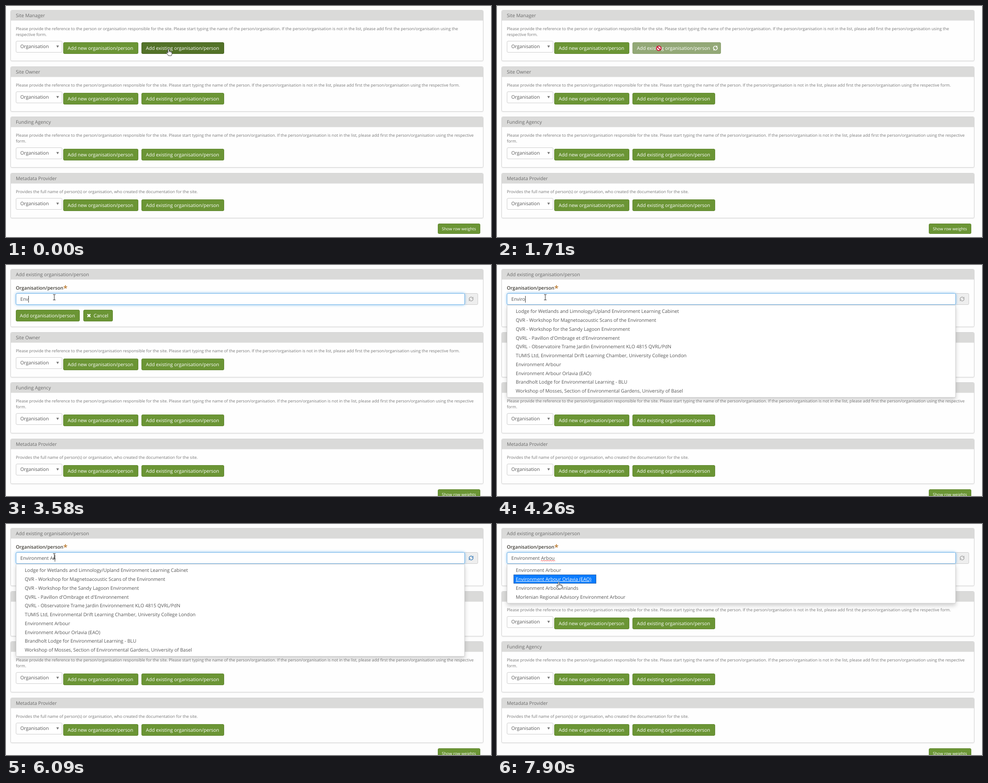
An HTML page that plays this animation: 1085x516 px, repeating every 8 s.

```html
<!DOCTYPE html>
<html lang="en">
<head>
<meta charset="utf-8">
<title>Add existing organisation</title>
<style>
html, body { margin: 0; width: 100%; height: 100%; overflow: hidden; background: #fdfdfd; }
svg { display: block; width: 1085px; height: 516px; }
text { font: 10.63px "Open Sans", "Noto Sans", sans-serif; white-space: pre; text-rendering: geometricPrecision; fill: #555; }
.head { fill: #6a6a6a; }
.small { font-size: 9.14px; fill: #777; }
.white { fill: #fff; }
.label { font-weight: 600; fill: #3f3c35; }
.star { font-size: 17px; font-weight: 600; fill: #b9772a; }
.panel { fill: #fefefe; stroke: #d3d3d3; filter: drop-shadow(0 1px 1px rgba(0,0,0,.08)); }
.btn { fill: #6b9535; stroke: #5e852e; }
.btn.hover { fill: #537228; stroke: #476322; }
.btn.off { fill: #93a877; stroke: #8ca16f; }
.field { fill: #fff; stroke: #ccc; }
.glow { fill: #fff; stroke: #66afe9; filter: drop-shadow(0 0 3px rgba(102,175,233,.75)); }
.menu { fill: #fff; stroke: #c9c9c9; filter: drop-shadow(0 5px 5px rgba(0,0,0,.18)); }
.item rect { fill: none; }
.pick rect { fill: #0a7cff; stroke: #1559a8; }
.pick text { fill: #fff; text-decoration: underline; }
</style>
</head>
<body>
<svg id="stage" viewBox="0 0 1085 516"></svg>
<script>
const LOOP = 8000;
const TYPED = 'Environment Arbou';
const KEY_TIMES = [3310, 3440, 3580, 3730, 3900, 4080, 4450, 4700, 4950, 5210,
  5450, 5530, 5770, 6020, 6100, 6240, 6590];
const BUSY = [[3730, 4200], [4450, 5050], [6020, 6320], [6870, 7050]];
const POINTER = [[0, 363.5, 95.5], [2060, 363.5, 95.5], [2180, 270, 88], [2340, 95, 74],
  [2420, 108, 72], [7480, 108, 72], [7620, 113, 84], [7900, 138, 129.5]];

const INTRO = 'Please provide the reference to the person';
const TAIL = 'If the person/organisation is not in the list, please add first the person/organisation using the';
const MENUS = [[
  'Lodge for Wetlands and Limnology/Upland Environment Learning Cabinet',
  'QVR - Workshop for Magnetoacoustic Scans of the Environment',
  'QVR - Workshop for the Sandy Lagoon Environment',
  "QVRL - Pavillon d'Ombrage et d'Environnement",
  'QVRL - Observatoire Trame Jardin Environnement KLO 4815 QVRL/PdN',
  'TUMIS Ltd, Environmental Drift Learning Chamber, University College London',
  'Environment Arbour',
  'Environment Arbour Orlavia (EAO)',
  'Brandholt Lodge for Environmental Learning - BLU',
  'Workshop of Mosses, Section of Environmental Gardens, University of Basel'
], [
  'Environment Arbour',
  'Environment Arbour Orlavia (EAO)',
  'Environment Arbour Inlands',
  'Western Fjord Secretariat of Environment and Meadow Restoration',
  'Orlavian Regional Chamber of Horticulture, Orchards, Environment and River Stewardship',
  'LORAB – Lodge for the Learning and Craftwork of Agro-Environment and Botanical Gardens, University of Trás-os-Montes e Alto Douro',
  'Morlenian Regional Advisory Environment Arbour'
], [
  'Environment Arbour',
  'Environment Arbour Orlavia (EAO)',
  'Environment Arbour Inlands',
  'Morlenian Regional Advisory Environment Arbour'
]];

const text = (x, y, str, cls = '') => `<text x="${x}" y="${y}" class="${cls}">${str}</text>`;
const rect = (x, y, w, h, cls, r = 2.5, extra = '') =>
  `<rect x="${x}" y="${y}" width="${w}" height="${h}" rx="${r}" class="${cls}" ${extra}/>`;
const button = (x, y, w, label, tx, id = '') =>
  rect(x, y, w, 25, 'btn', 2.5, id && `id="${id}"`) + text(tx, y + 16.4, label, 'white');

function panel(y, h, title) {
  return rect(10.5, y, 1057, h, 'panel') +
    `<path d="M11 ${y + 23}V${y + 3}q0-2.5 2.5-2.5H1064.5q2.5 0 2.5 2.5V${y + 23}z" fill="#dadad9"/>` +
    text(22, y + 15.3, title, 'head');
}

function section(y, title, lines, id) {
  const drop = lines.length > 1 ? 0 : -13;
  return panel(y, 113 + drop, title) +
    lines.map((line, i) => text(22, y + 44.5 + 12.8 * i, line, 'small')).join('') +
    rect(22.5, y + 69 + drop, 103, 25, 'field') +
    text(32, y + 84.6 + drop, 'Organisation') +
    `<path d="M112.5 ${y + 78.8 + drop}h6l-3 5z" fill="#777"/>` +
    button(128.5, y + 72 + drop, 167, 'Add new organisation/person', 138) +
    button(303.5, y + 72 + drop, 184, 'Add existing organisation/person', 313, id);
}

const refresh = id => `<g id="${id}" fill="none" stroke="currentColor">
  <path d="M-4.2 1A4.3 4.3 0 0 1 2.8-3.3M4.2-1A4.3 4.3 0 0 1-2.8 3.3" stroke-width="1.5"/>
  <path d="M5-5.2V-1H.8zM-5 5.2V1H-.8z" fill="currentColor" stroke="none"/></g>`;

const menu = (items, i) => `<g id="menu${i}">` +
  rect(22.5, 89.5, 1003.5, items.length * 19.77 + 8.5, 'menu', 2) +
  items.map((item, n) => `<g class="item">` +
    rect(37.5, 93.7 + 19.77 * n, 184.5, 19, '', 0) +
    text(42, 107.3 + 19.77 * n, item) + '</g>').join('') + '</g>';

const stage = document.getElementById('stage');
stage.innerHTML = `
<g id="overview">
  ${section(9.5, 'Site Manager', [
    `${INTRO} or organisation responsible for the site. Please start typing the name of the person/organisation. ${TAIL}`,
    'respective form.'], 'existing')}
  <g id="wait" transform="translate(488.5 94)" color="#fff">${refresh('waitIcon')}</g>
</g>
<g id="form">
  ${panel(9.5, 128.5, 'Add existing organisation/person')}
  ${text(22, 55.2, 'Organisation/person', 'label')}${text(128.2, 58.3, '*', 'star')}
  ${rect(1024.5, 63.5, 31, 25, 'field', 2.5, 'style="fill:#eee"')}
  ${rect(22.5, 63.5, 1003.5, 25, 'field')}
  ${rect(22.5, 63.5, 1003.5, 25, 'glow', 2.5, 'id="glow"')}
  <text id="typed" x="32" y="80.3"></text>
  <path id="squiggle" d="M98 83${'l2-2l2 2'.repeat(8)}" fill="none" stroke="#e33" stroke-width=".9"/>
  <path id="caret" d="M0 69V84" stroke="#333"/>
  <g transform="translate(1040.5 76)">${refresh('busyIcon')}</g>
  ${button(22.5, 100.5, 142, 'Add organisation/person', 31)}
  ${button(173.5, 100.5, 65, 'Cancel', 196)}
  <path d="M182.3 109.8l6.4 6.4m0-6.4l-6.4 6.4" stroke="#fff" stroke-width="2.6"/>
</g>
<g id="rest">
  ${section(135.5, 'Site Owner', [
    `${INTRO}/organisation responsible for the site. Please start typing the name of the person. ${TAIL} respective form.`])}
  ${section(247.5, 'Funding Agency', [
    `${INTRO}/organisation responsible for the site. Please start typing the name of the person/organisation. ${TAIL} respective`,
    'form.'])}
  ${section(373.5, 'Metadata Provider', [
    'Provides the full name of person(s) or organisation, who created the documentation for the site.'])}
  ${rect(966.5, 486.5, 94, 22, 'btn')}${text(975, 500.8, 'Show row weights', 'small white')}
</g>
${MENUS.map(menu).join('')}
<g id="pointer">
  <circle id="click" r="8.7" fill="#ffec2e" opacity=".85"/>
  <path id="hand" d="M-1.4 1.3Q0-.8 1.4 1.3V5.4Q3.4 4.8 3.9 6.2Q5.6 5.4 6 7Q7.7 6.6 7.7 8.6V11Q7.6 13 6.5 15.5H-.2Q-1.4 12.5-4.7 9.6Q-4.9 7.6-3 8.2L-1.4 9.7zM1.4 5.5V8M3.9 6.4V8.2M6 7.2V8.6" fill="#fff" stroke="#222" stroke-width=".9"/>
  <path id="arrow" d="M0 0V15.5L3.6 12.2L6 18L8.4 17L6 11.5H11z" fill="#fff" stroke="#222" stroke-width=".9"/>
  <path id="beam" d="M-3-6h2.2L0-5.3L.8-6H3M0-5.3V5.3M-3 6h2.2L0 5.3L.8 6H3" fill="none" stroke="#333" stroke-width="1.1"/>
  <g id="blocked" transform="translate(-1.5 -1)"><circle r="5" fill="#fff" stroke="#c8102e" stroke-width="2.2"/>
    <path d="M-3.5-3.5L3.5 3.5" stroke="#c8102e" stroke-width="2.2"/></g>
</g>`;

const el = {};
stage.querySelectorAll('[id]').forEach(node => el[node.id] = node);
const choices = [...el.menu2.querySelectorAll('.item')];
choices.forEach(choice => {
  const width = choice.querySelector('text').getComputedTextLength();
  choice.querySelector('rect').setAttribute('width', Math.round(width + 15));
});

const show = (id, on) => el[id].style.display = on ? '' : 'none';
const during = (t, from, to) => t >= from && t < to;
const move = (id, x, y) => el[id].setAttribute('transform', `translate(${x} ${y})`);
const spin = (id, t) => el[id].setAttribute('transform', `rotate(${Math.floor(t / 80) * 28.8})`);

function pointerAt(t) {
  const next = POINTER.findIndex(p => p[0] > t);
  if (next < 0) return POINTER.at(-1).slice(1);
  const [a, b] = [POINTER[next - 1], POINTER[next]];
  const k = (t - a[0]) / (b[0] - a[0]);
  return [a[1] + (b[1] - a[1]) * k, a[2] + (b[2] - a[2]) * k];
}

function drawForm(t) {
  const count = KEY_TIMES.filter(time => time <= t).length;
  const value = TYPED.slice(0, count);
  if (el.typed.textContent !== value) el.typed.textContent = value;
  const end = count ? el.typed.getComputedTextLength() : 0;
  move('caret', Math.round(32 + end) + .5, 0);
  show('caret', during(t, 2570, 3120) || during(t, 3310, 7200));
  show('squiggle', t >= 7290);
  el.glow.style.opacity = Math.max(0, Math.min(1, (t - 2600) / 140));

  const busy = BUSY.find(([from, to]) => during(t, from, to));
  const stalled = during(t, 5050, 6020);
  spin('busyIcon', busy ? t - busy[0] : 0);
  el.busyIcon.style.color = stalled ? '#98a6c4' : busy ? '#4f8ac0' : '#adadad';
}

function drawPointer(t, formOpen) {
  const [x, y] = pointerAt(t);
  move('pointer', x, y);
  const waiting = during(t, 480, 1790);
  const overField = formOpen && y < 89;
  const overMenu = t > 7480 && y >= 89;
  show('blocked', waiting);
  show('hand', t < 480 || overMenu);
  show('beam', overField);
  show('arrow', formOpen && !overField && !overMenu);
  show('click', during(t, 320, 560) || during(t, 2570, 2700));
  const picked = overMenu ? (y < 113 ? 0 : 1) : -1;
  choices.forEach((choice, i) => choice.classList.toggle('pick', i === picked));
}

function draw(t) {
  const formOpen = t >= 1790;
  const waiting = during(t, 480, 1790);
  show('overview', !formOpen);
  show('form', formOpen);
  move('rest', 0, formOpen ? 15 : 0);
  el.existing.setAttribute('class', waiting ? 'btn off' : 'btn hover');
  el.existing.setAttribute('width', waiting ? 197 : 184);
  show('wait', waiting);
  spin('waitIcon', t - 710);
  show('menu0', during(t, 4220, 6320));
  show('menu1', during(t, 6320, 7050));
  show('menu2', t >= 7050);
  if (formOpen) drawForm(t);
  drawPointer(t, formOpen);
}

const start = performance.now();
function tick() {
  draw((performance.now() - start) % LOOP);
  requestAnimationFrame(tick);
}
tick();
</script>
</body>
</html>
```
